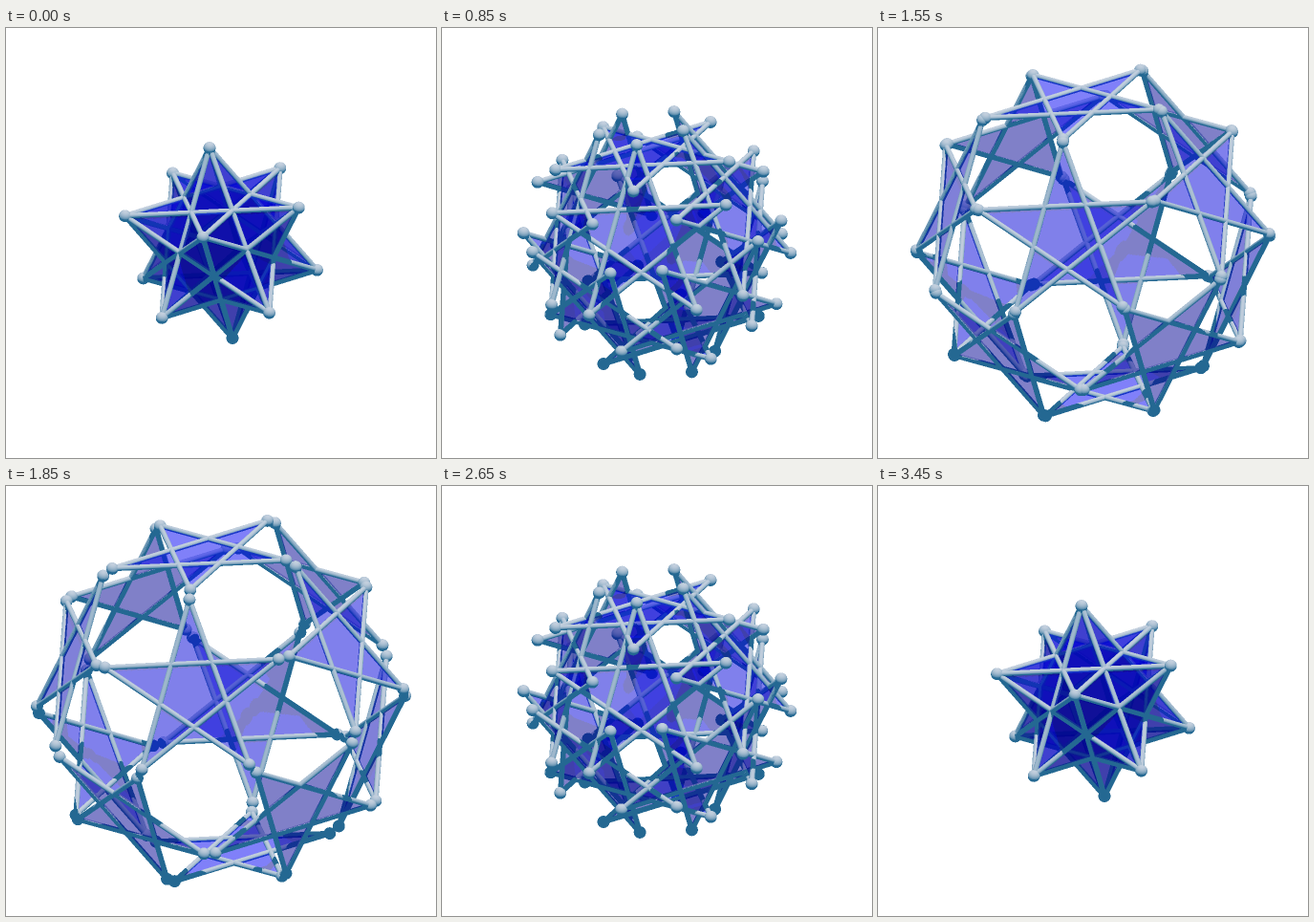
Recreate the animation shown at these times as an HTML page with a canvas. Size 450 by 450 pixels, loop 3.5 s.

```html
<!DOCTYPE html>
<html lang="en">
<head>
<meta charset="utf-8">
<title>Expanding star polyhedron</title>
<style>
html, body { margin: 0; width: 100%; height: 100%; overflow: hidden; background: #fff; }
canvas { display: block; width: 450px; height: 450px; }
</style>
</head>
<body>
<canvas id="stage" width="450" height="450"></canvas>
<script>
const SIZE = 450, STEP = 50, FRAMES = 70;
const RADIUS = 108.6, TUBE = 2.8, BALL = 6.4;
const ctx = document.getElementById('stage').getContext('2d');

const dot = (a, b) => a[0] * b[0] + a[1] * b[1] + a[2] * b[2];
const mul = (a, s) => a.map(v => v * s);
const add = (a, b, s = 1) => a.map((v, i) => v + b[i] * s);
const unit = a => mul(a, 1 / Math.hypot(...a));
const cross = (a, b) => [
  a[1] * b[2] - a[2] * b[1], a[2] * b[0] - a[0] * b[2], a[0] * b[1] - a[1] * b[0]];
const frame = (z, hint) => {
  const x = unit(add(hint, z, -dot(hint, z)));
  return [x, cross(z, x), z];
};

// x points right, y down, z towards the viewer
const LIGHT = unit([0.08, -0.75, 0.62]);
const LIGHT_VIEW = frame(LIGHT, [1, 0, 0]);
const EYE_VIEW = [[1, 0, 0], [0, 1, 0], [0, 0, 1]];

// Unit icosahedron; its vertices are also the axes of the twelve pentagrams
const [e1, e2, e3] = frame(unit([-0.175, -0.055, 0.983]), [-0.036, -0.997, -0.063]);
const ring = (axis, x, y, k) => {
  const a = k * Math.PI * 0.4, c = 1 / Math.sqrt(5);
  return add(add(mul(axis, c), x, 2 * c * Math.cos(a)), y, 2 * c * Math.sin(a));
};
const half = [e3, ...[0, 1, 2, 3, 4].map(k => ring(e3, e1, e2, k))];
const axes = [...half, ...half.map(v => mul(v, -1))];
const baseStars = axes.map(axis => {
  const near = axes.find(v => Math.abs(dot(v, axis) - 1 / Math.sqrt(5)) < 0.01);
  const [x, y] = frame(axis, near);
  return { axis, tips: [0, 1, 2, 3, 4].map(k => ring(axis, x, y, k)) };
});

function buildStars(spread) {
  return baseStars.map(({ axis, tips }) => ({
    axis,
    center: mul(axis, RADIUS * (1 / Math.sqrt(5) + spread)),
    tips: tips.map(t => mul(add(t, axis, spread), RADIUS))
  }));
}

function project(stars, view) {
  const turn = v => view.map(b => dot(b, v));
  return stars.map(s => ({ axis: turn(s.axis), center: turn(s.center), tips: s.tips.map(turn) }));
}

function makeBuffer(size, scale) {
  return { size, scale, mid: size / 2, depth: new Float32Array(size * size) };
}

// Calls visit(x, y, index) for each sample inside a box given in scene units
function scan(buf, x0, x1, y0, y1, visit) {
  const { size, scale, mid } = buf;
  const low = v => Math.max(0, Math.floor(v * scale + mid));
  const high = v => Math.min(size - 1, Math.ceil(v * scale + mid));
  const left = low(x0), right = high(x1), bottom = high(y1);
  for (let j = low(y0); j <= bottom; j++) {
    const y = (j + 0.5 - mid) / scale;
    for (let i = left; i <= right; i++) visit((i + 0.5 - mid) / scale, y, j * size + i);
  }
}

function drawBall(buf, [cx, cy, cz], plot) {
  scan(buf, cx - BALL, cx + BALL, cy - BALL, cy + BALL, (x, y, i) => {
    const u = x - cx, v = y - cy, hh = BALL * BALL - u * u - v * v;
    if (hh <= 0) return;
    const h = Math.sqrt(hh);
    plot(i, cz + h, u / BALL, v / BALL, h / BALL);
  });
}

function drawTube(buf, a, b, plot) {
  const span = add(b, a, -1), length = Math.hypot(...span);
  const [dx, dy, dz] = mul(span, 1 / length);
  const m = Math.hypot(dx, dy);
  if (m < 0.01) return;
  const nx = -dy / m, ny = dx / m, wx = -dx * dz / m, wy = -dy * dz / m;
  const [ax, ay, az] = a;
  scan(buf, Math.min(ax, b[0]) - TUBE, Math.max(ax, b[0]) + TUBE,
    Math.min(ay, b[1]) - TUBE, Math.max(ay, b[1]) + TUBE, (x, y, i) => {
      const u = x - ax, v = y - ay, q = u * nx + v * ny;
      if (q >= TUBE || q <= -TUBE) return;
      const h = Math.sqrt(TUBE * TUBE - q * q);
      const s = ((u * dx + v * dy) / m + h * dz) / m;
      if (s < 0 || s > length) return;
      plot(i, az + s * dz + h * m,
        (q * nx + h * wx) / TUBE, (q * ny + h * wy) / TUBE, h * m / TUBE);
    });
}

function drawFace(buf, { axis, center, tips }, plot) {
  if (Math.abs(axis[2]) < 0.01) return;
  const [cx, cy, cz] = center;
  const lines = tips.map((p, k) => {
    const q = tips[(k + 2) % 5];
    const a = p[1] - q[1], b = q[0] - p[0], c = -a * p[0] - b * p[1];
    const sign = a * cx + b * cy + c < 0 ? -1 : 1;
    return [a * sign, b * sign, c * sign];
  });
  const xs = tips.map(t => t[0]), ys = tips.map(t => t[1]);
  const sx = axis[0] / axis[2], sy = axis[1] / axis[2];
  scan(buf, Math.min(...xs), Math.max(...xs), Math.min(...ys), Math.max(...ys), (x, y, i) => {
    // A point lies in a pentagram when at most one of its lines excludes it
    let outside = 0;
    for (let k = 0; k < 5; k++) {
      const l = lines[k];
      if (l[0] * x + l[1] * y + l[2] < 0 && ++outside > 1) return;
    }
    plot(i, cz - sx * (x - cx) - sy * (y - cy), x, y);
  });
}

function drawFrame(buf, stars, plot) {
  for (const { tips } of stars) {
    tips.forEach((tip, k) => {
      drawTube(buf, tip, tips[(k + 2) % 5], plot);
      drawBall(buf, tip, plot);
    });
  }
}

const eye = makeBuffer(SIZE * 2, 2);
const lamp = makeBuffer(690, 1.5);
const facing = new Float32Array(eye.depth.length);
const color = new Float32Array(eye.depth.length * 3);

function castShadows(stars) {
  lamp.depth.fill(-1e4);
  const plot = (i, z) => { if (z > lamp.depth[i]) lamp.depth[i] = z; };
  const seen = project(stars, LIGHT_VIEW);
  drawFrame(lamp, seen, plot);
  seen.forEach(s => drawFace(lamp, s, plot));
}

const [LX, LY] = LIGHT_VIEW;
function isLit(x, y, z, bias) {
  const i = Math.floor((x * LX[0] + y * LX[1] + z * LX[2]) * lamp.scale + lamp.mid);
  const j = Math.floor((x * LY[0] + y * LY[1] + z * LY[2]) * lamp.scale + lamp.mid);
  const d = x * LIGHT[0] + y * LIGHT[1] + z * LIGHT[2];
  return lamp.depth[j * lamp.size + i] <= d + bias;
}

function shadeFrame() {
  const { size, scale, mid, depth } = eye;
  color.fill(255);
  for (let i = 0; i < depth.length; i++) {
    if (depth[i] < -1e3) continue;
    const x = (i % size + 0.5 - mid) / scale;
    const y = (Math.floor(i / size) + 0.5 - mid) / scale;
    const n = facing[i];
    const k = n > 0 && isLit(x, y, depth[i], 1.4) ? Math.pow(n, 0.6) : 0;
    color[3 * i] = 36 + 160 * k;
    color[3 * i + 1] = 104 + 104 * k;
    color[3 * i + 2] = 146 + 76 * k;
  }
}

function blendFace(star) {
  const n = dot(star.axis, LIGHT) * Math.sign(star.axis[2]);
  const bias = 1 + 0.6 / Math.max(n, 0.1);
  drawFace(eye, star, (i, z, x, y) => {
    if (z <= eye.depth[i]) return;
    const blue = n > 0 && isLit(x, y, z, bias) ? 145 + 105 * n : 145;
    color[3 * i] *= 0.5;
    color[3 * i + 1] *= 0.5;
    color[3 * i + 2] = (color[3 * i + 2] + blue) / 2;
  });
}

function downsample() {
  const image = ctx.createImageData(SIZE, SIZE), row = eye.size * 3;
  for (let y = 0, o = 0; y < SIZE; y++) {
    for (let x = 0; x < SIZE; x++, o += 4) {
      const i = y * 2 * row + x * 6;
      for (let c = 0; c < 3; c++) {
        image.data[o + c] =
          (color[i + c] + color[i + c + 3] + color[i + c + row] + color[i + c + row + 3]) / 4;
      }
      image.data[o + 3] = 255;
    }
  }
  return image;
}

function render(spread) {
  const stars = buildStars(spread);
  castShadows(stars);
  const seen = project(stars, EYE_VIEW).sort((a, b) => a.center[2] - b.center[2]);
  eye.depth.fill(-1e4);
  drawFrame(eye, seen, (i, z, nx, ny, nz) => {
    if (z <= eye.depth[i]) return;
    eye.depth[i] = z;
    facing[i] = nx * LIGHT[0] + ny * LIGHT[1] + nz * LIGHT[2];
  });
  shadeFrame();
  seen.forEach(blendFace);
  return downsample();
}

const cache = new Map();
let shown = -1;

function tick() {
  const step = Math.floor(performance.now() / STEP) % FRAMES;
  const spread = Math.max(0, Math.min(step, FRAMES - step) - 4.6) * 0.039;
  if (spread !== shown) {
    if (!cache.has(spread)) cache.set(spread, render(spread));
    ctx.putImageData(cache.get(spread), 0, 0);
    shown = spread;
  }
  requestAnimationFrame(tick);
}
tick();
</script>
</body>
</html>
```
